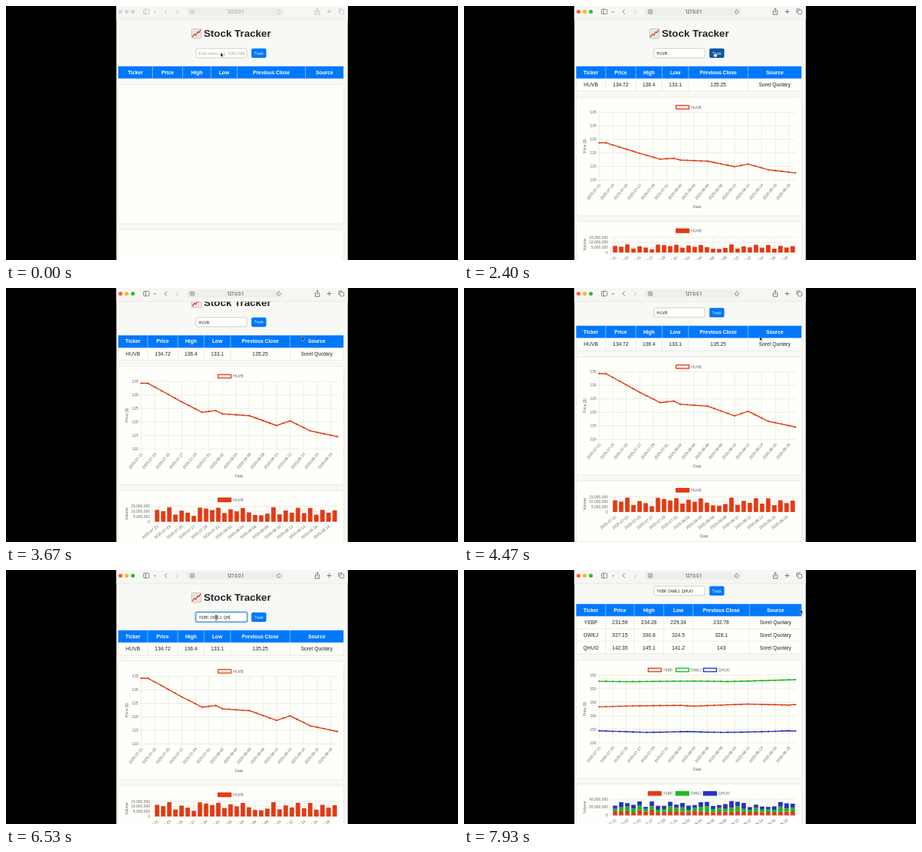
Write an HTML page with a canvas that moves like this. It is 600x338 px and loops after 8000 ms.

```html
<!DOCTYPE html>
<html lang="en">
<head>
<meta charset="utf-8">
<title>Stock Tracker</title>
<style>
html, body { margin: 0; width: 100%; height: 100%; overflow: hidden; background: #000; }
canvas { display: block; width: 600px; height: 338px; }
</style>
</head>
<body>
<canvas id="stage" width="600" height="338"></canvas>
<script>
const ctx = document.getElementById('stage').getContext('2d');
const LOOP = 8000, DAYS = 30;
const SANS = '"Liberation Sans", Arial, sans-serif';
const UI = 'Inter, "Liberation Sans", sans-serif';
const C = {
  page: '#f8f8f5', card: '#fefefa', bar: '#f6f6f2', line: '#e7e7db', grid: '#e9e9dc',
  text: '#222226', soft: '#68686a', blue: '#0078fc', hover: '#0856a8',
  red: '#e43a14', green: '#1eb81e', navy: '#2831bc'
};

const smooth = p => p * p * (3 - 2 * p);
const linear = p => p;

// Interpolates keys of the form [position, value, ...]
function track(keys, t, ease = smooth) {
  let i = 1;
  while (i < keys.length - 1 && keys[i][0] < t) i++;
  const a = keys[i - 1], b = keys[i];
  const p = ease(Math.min(1, Math.max(0, (t - a[0]) / (b[0] - a[0]))));
  return a.slice(1).map((v, k) => v + (b[k + 1] - v) * p);
}
const daily = fn => Array.from({ length: DAYS }, (_, i) => fn(i));
const trend = (...keys) => daily(i => track(keys, i, linear)[0]);
const noise = (i, seed) => { const v = Math.sin(i * 12.99 + seed * 78.2) * 437.5; return v - Math.floor(v); };

const totals = daily(i => 20 + 15 * noise(i, 4));
const redShare = i => 0.25 + 0.2 * noise(i, 1);
const greenShare = i => 0.25 + 0.15 * noise(i, 2);

const SOURCE = 'Sorel Quotary';
const heads = ['Ticker', 'Price', 'High', 'Low', 'Previous Close', 'Source'];
const dates = Array.from({ length: 15 }, (_, i) =>
  new Date(Date.UTC(2025, 6, 21 + 2 * i)).toISOString().slice(0, 10));

const empty = { cols: [149, 194.5, 234.5, 272, 307, 397.5, 448], rows: [] };
const single = {
  cols: [149, 188, 228, 263, 298, 377, 448],
  rows: [['HUVB', '134.72', '136.4', '133.1', '135.25', SOURCE]],
  min: 110, max: 135, step: 5, volMax: 15, volStep: 5, volTop: 21.3, legendX: 281.5,
  series: [{
    name: 'HUVB', color: C.red, tint: '#f7e6e0',
    price: trend([0, 134.3], [1, 134.3], [6, 127.4], [9, 123.6], [11, 124.2], [12, 123], [16, 122.3],
      [20, 118.7], [22, 120.4], [25, 116.7], [29, 114.6]),
    volume: daily(i => 5.5 + 9 * noise(i, 3))
  }]
};
const multi = {
  cols: [149, 188, 226, 265, 304, 379, 448],
  rows: [
    ['YEBF', '231.59', '234.28', '229.34', '232.78', SOURCE],
    ['DWEJ', '327.15', '330.8', '324.5', '328.1', SOURCE],
    ['QHUO', '142.35', '145.1', '141.2', '143', SOURCE]
  ],
  min: 100, max: 350, step: 50, volMax: 40, volStep: 20, volTop: 20, legendX: 244.5,
  series: [
    { name: 'YEBF', color: C.red, tint: '#f8efec',
      price: trend([0, 232.5], [5, 236], [12, 238], [14, 235], [22, 243], [28, 239], [29, 241]),
      volume: daily(i => totals[i] * redShare(i)) },
    { name: 'DWEJ', color: C.green, tint: '#eef8ec',
      price: trend([0, 327], [4, 325.5], [14, 328], [19, 326], [25, 330], [29, 333]),
      volume: daily(i => totals[i] * greenShare(i)) },
    { name: 'QHUO', color: C.navy, tint: '#eeeef8',
      price: trend([0, 144], [7, 138], [13, 141], [18, 138], [24, 140.5], [28, 144], [29, 143]),
      volume: daily(i => totals[i] * (1 - redShare(i) - greenShare(i))) }
  ]
};

const FIRST = 2307, SECOND = 6930, RISE = 500;
const FIRST_CLICK = 1400, REFOCUS = 5680, SECOND_CLICK = 6800;
const FIRST_ENTRY = 'HUVB', SECOND_ENTRY = 'YEBF, DWEJ, QHUO';
const scrollKeys = [[3270, 0], [4000, 30], [4470, 30], [5200, 0], [7690, 0], [8030, 44]];
const pointerKeys = [[850, 285, 62], [1300, 333, 62], [2650, 333, 62], [3130, 392.5, 64.5],
  [5190, 392.5, 64.5], [5680, 279, 62], [6560, 279, 62], [6780, 333, 62], [6960, 333, 62], [7450, 446.5, 52.5]];

function text(s, x, y, size, color = C.text, align = 'center', font = SANS, weight = '') {
  ctx.font = `${weight} ${size}px ${font}`;
  ctx.fillStyle = color;
  ctx.textAlign = align;
  ctx.textBaseline = 'alphabetic';
  ctx.fillText(s, x, y + size * 0.36);
}
function turned(s, x, y, degrees, size, align) {
  ctx.save();
  ctx.translate(x, y);
  ctx.rotate(-degrees * Math.PI / 180);
  text(s, 0, 0, size, C.soft, align);
  ctx.restore();
}
function box(x, y, w, h, r, fill, stroke, width = 0.7) {
  ctx.beginPath();
  ctx.roundRect(x, y, w, h, r);
  if (fill) { ctx.fillStyle = fill; ctx.fill(); }
  if (stroke) { ctx.strokeStyle = stroke; ctx.lineWidth = width; ctx.stroke(); }
}
function path(points, color, width = 0.8) {
  ctx.beginPath();
  points.forEach(([x, y]) => ctx.lineTo(x, y));
  ctx.strokeStyle = color;
  ctx.lineWidth = width;
  ctx.lineJoin = 'round';
  ctx.stroke();
}
const hline = (x1, x2, y, color, width) => path([[x1, y], [x2, y]], color, width);
const vline = (x, y1, y2, color, width) => path([[x, y1], [x, y2]], color, width);
function disc(x, y, r, color) {
  ctx.beginPath();
  ctx.arc(x, y, r, 0, 7);
  ctx.fillStyle = color;
  ctx.fill();
}

function toolbar(active) {
  const ink = active ? '#5c5c5e' : '#b9b9b4';
  box(146, 0, 308, 18, 0, C.bar);
  hline(146, 454, 18, '#e2e2d8', 0.6);
  ['#fb5a50', '#f8b820', '#2cc03c'].forEach((c, i) => disc(152 + i * 8.2, 7.5, 2.6, active ? c : '#d5d5d0'));
  box(182.5, 4.3, 7.5, 6.4, 1.2, null, ink);
  vline(185.2, 4.3, 10.7, ink);
  path([[196.2, 7], [197.7, 8.5], [199.2, 7]], ink);
  path([[213.5, 4.5], [210.5, 7.5], [213.5, 10.5]], ink);
  path([[225.8, 4.5], [228.8, 7.5], [225.8, 10.5]], '#aaaaa6');
  box(240, 2.3, 128, 10.7, 2.5, '#eeeeea');
  box(244.8, 5, 5, 5, 1, null, ink);
  hline(246, 248.6, 6.8, ink, 0.6);
  hline(246, 248.6, 8.3, ink, 0.6);
  text('127.0.0.1', 304.5, 7.7, 5.6, active ? '#38383a' : '#8f8f8c', 'center', UI);
  ctx.beginPath();
  ctx.arc(362, 7.8, 2.3, -0.6, 4.6);
  ctx.strokeStyle = ink;
  ctx.lineWidth = 0.7;
  ctx.stroke();
  path([[361.8, 4.2], [363.2, 5.4], [361.8, 6.6]], ink, 0.6);
  path([[411.8, 6.5], [410.5, 6.5], [410.5, 11.3], [416, 11.3], [416, 6.5], [414.7, 6.5]], ink);
  vline(413.25, 3.2, 9, ink);
  path([[411.6, 4.8], [413.25, 3.2], [414.9, 4.8]], ink);
  hline(426, 432, 7.5, ink);
  vline(429, 4.5, 10.5, ink);
  box(443.3, 5.7, 5.2, 5.2, 1, null, ink);
  path([[441.7, 9], [441.7, 4], [446.6, 4]], ink);
}

function heading() {
  box(246.5, 30.5, 12.5, 12.5, 1, '#f4f0e8', '#a5a09a', 0.6);
  for (let d = 3.1; d < 12; d += 3.1) {
    vline(246.5 + d, 30.5, 43, '#cfd4cc', 0.5);
    hline(246.5, 259, 30.5 + d, '#cfd4cc', 0.5);
  }
  path([[247.3, 41.5], [250, 37.5], [252, 39], [254.5, 34.5], [256, 35.5], [258.4, 31.5]], '#d8343a', 1.3);
  text('Stock Tracker', 262.5, 36.6, 13.6, C.text, 'left', SANS, 'bold');
}

const typed = (entry, t, start, pace) => entry.slice(0, Math.max(0, Math.floor((t - start) / pace)));

function form(t, hovering) {
  const focused = (t >= 100 && t < FIRST_CLICK) || (t >= REFOCUS && t < SECOND_CLICK);
  const value = t < REFOCUS + 50 ? typed(FIRST_ENTRY, t, 250, 100) : typed(SECOND_ENTRY, t, REFOCUS + 50, 55);
  if (focused) box(251.5, 55.7, 69, 13.8, 2.5, null, '#78b4ee', 1.6);
  box(252.2, 56.4, 67.6, 12.4, 2, '#fffffc', focused ? '#3d8cde' : '#c9c9c2', 0.8);
  ctx.save();
  ctx.beginPath();
  ctx.rect(254, 56, 63, 13);
  ctx.clip();
  if (value) text(value, 255.8, 62.9, 5.1, C.text, 'left');
  else text('Enter tickers (e.g. YEBF,DWEJ)', 255.8, 62.9, 4.7, '#a9a9a2', 'left');
  const caret = 256.2 + (value && ctx.measureText(value).width);
  if (focused) vline(caret, 59.8, 65.8, C.text, 0.6);
  ctx.restore();
  box(325.7, 56.5, 19.8, 12.5, 2, hovering ? C.hover : C.blue);
  text('Track', 335.6, 62.8, 4.9, '#fff');
}

function table({ cols, rows }) {
  const center = i => (cols[i] + cols[i + 1]) / 2;
  const rowHeight = 16.7, bottom = 96.6 + rows.length * rowHeight;
  box(149, 80, 299, bottom - 80, 0, C.card);
  box(149, 80.2, 299, 16.4, 0, C.blue);
  heads.forEach((h, i) => text(h, center(i), 88.2, 6.8, '#fff', 'center', SANS, 'bold'));
  cols.slice(1, -1).forEach(x => vline(x, 80.2, 96.6, '#a9cff4', 0.7));
  cols.forEach(x => vline(x, 96.6, bottom, C.line, 0.7));
  rows.forEach((row, r) => {
    const y = 96.6 + r * rowHeight;
    row.forEach((s, i) => text(s, center(i), y + 8.1, 6.8));
    hline(149, 448, y + rowHeight, C.line, 0.7);
  });
}

function card(top, height) {
  box(148.8, top, 299.7, height, 3, C.card, C.line, 0.8);
}
function legend({ series, legendX }, y, filled) {
  series.forEach((s, i) => {
    const x = legendX + i * 36.7;
    box(x, y - 2.4, 17.3, 4.8, 0, filled ? s.color : s.tint, s.color, 1.3);
    text(s.name, x + 19.8, y, 5, C.soft, 'left');
  });
}
function dateAxis(left, gap, top, bottom, angle) {
  dates.forEach((d, i) => {
    const x = left + i * 2 * gap;
    vline(x, top, bottom + 3, C.grid, 0.7);
    turned(d, x + 1, bottom + 5.7, angle, 5.1, 'right');
  });
}

function priceChart(data, top, grow) {
  const left = 179.5, gap = 8.98, bottom = top + 110, height = 90;
  const rise = v => (v - data.min) / (data.max - data.min) * height;
  card(top, 157.5);
  legend(data, top + 13.2, false);
  for (let v = data.min; v <= data.max; v += data.step) {
    hline(left - 3, 440, bottom - rise(v), C.grid, 0.7);
    text(v, 175.5, bottom - rise(v), 5, C.soft, 'right');
  }
  dateAxis(left, gap, bottom - height, bottom, 50);
  turned('Price ($)', 160, top + 65, 90, 5, 'center');
  text('Date', 309.5, top + 145.7, 5.2, C.soft);
  data.series.forEach(s => {
    const points = s.price.map((v, i) => [left + i * gap, bottom - rise(v) * grow]);
    path(points, s.color, 1.4);
    points.forEach(([x, y]) => disc(x, y, 1.15, s.color));
  });
}

function volumeChart(data, top, grow) {
  const left = 196.5, slot = 8.13, bottom = top + 41.6, height = 41.6 - data.volTop;
  card(top, 81);
  legend(data, top + 12.6, true);
  for (let v = 0; v <= data.volMax; v += data.volStep) {
    const y = bottom - v / data.volMax * height;
    hline(left - 3, 440, y, C.grid, 0.7);
    text(v ? `${v},000,000` : '0', 191, y, 5, C.soft, 'right');
  }
  dateAxis(left + slot / 2, slot, bottom - height, bottom, 38);
  turned('Volume', 160, top + 31, 90, 5, 'center');
  text('Date', 318.8, top + 73.2, 5.2, C.soft);
  const scale = height / data.volMax * grow;
  const tops = daily(() => bottom);
  data.series.forEach(s => s.volume.forEach((v, i) => {
    tops[i] -= v * scale;
    box(left + (i + 0.14) * slot, tops[i], slot * 0.72, v * scale, 0, s.color);
  }));
}

function pointer(x, y, t) {
  if (t > 70 && x < 320) {
    path([[x - 1.5, y - 2], [x, y - 1.4], [x + 1.5, y - 2]], '#222', 0.7);
    vline(x, y - 1.4, y + 4.4, '#222');
    path([[x - 1.5, y + 5], [x, y + 4.4], [x + 1.5, y + 5]], '#222', 0.7);
  } else if (overButton(x)) {
    box(x - 0.6, y - 0.5, 1.5, 4, 0.7, '#fff', '#222', 0.5);
    box(x - 1.6, y + 2, 4.6, 4, 1.4, '#fff', '#222', 0.5);
  } else {
    const arrow = [[0, 0], [0, 5.6], [1.3, 4.4], [2.3, 6.6], [3.2, 6.2], [2.2, 4.1], [4, 4]];
    ctx.beginPath();
    arrow.forEach(([dx, dy]) => ctx.lineTo(x + dx, y + dy));
    ctx.closePath();
    ctx.fillStyle = '#111';
    ctx.fill();
    ctx.strokeStyle = '#fff';
    ctx.lineWidth = 0.4;
    ctx.stroke();
  }
}
const overButton = x => x > 326 && x < 345;

function draw(t) {
  const data = t < FIRST ? empty : t < SECOND ? single : multi;
  const p = Math.min(1, (t - (t < SECOND ? FIRST : SECOND)) / RISE);
  const grow = 1 - (1 - p) ** 4;
  const [x, y] = track(pointerKeys, t);
  const [scroll] = track(scrollKeys, t);

  ctx.fillStyle = '#000';
  ctx.fillRect(0, 0, 600, 338);
  ctx.save();
  ctx.beginPath();
  ctx.rect(146.5, 0, 307.2, 338);
  ctx.clip();
  box(146, 0, 308, 338, 0, C.page);

  ctx.save();
  ctx.translate(0, -scroll);
  heading();
  form(t, overButton(x));
  table(data);
  if (data === empty) {
    card(104.5, 185.5);
    card(297.5, 185.5);
  } else {
    const top = 121.5 + (data.rows.length - 1) * 16.65;
    priceChart(data, top, grow);
    volumeChart(data, top + 165, grow);
  }
  ctx.restore();
  toolbar(t >= 100);
  pointer(x, y, t);
  ctx.restore();
}

function tick() {
  draw(performance.now() % LOOP);
  requestAnimationFrame(tick);
}
tick();
</script>
</body>
</html>
```
